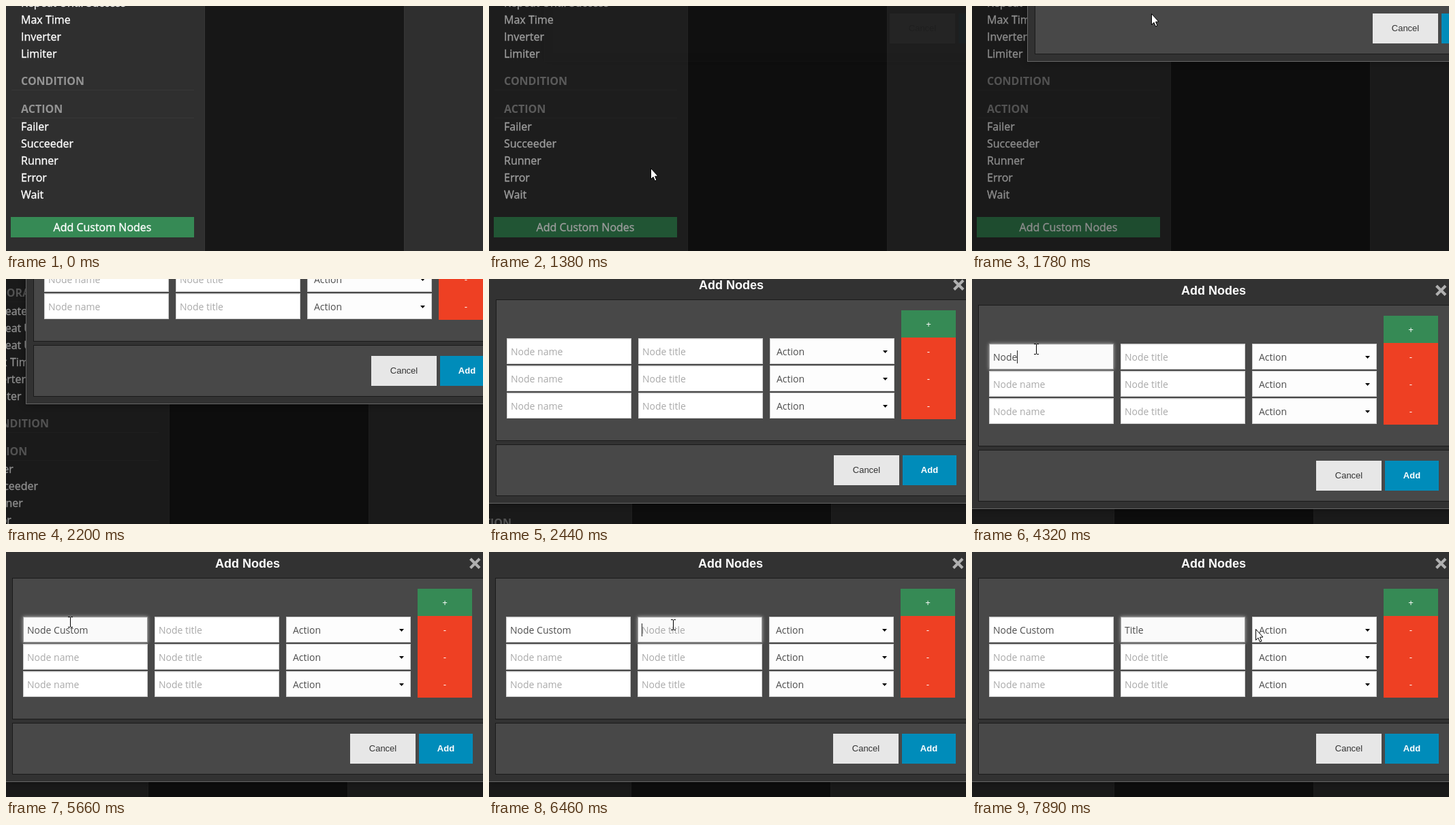
An HTML page with a canvas for the animation above (8 s loop, 700x360 px).

```html
<!DOCTYPE html>
<html lang="en">
<head>
<meta charset="utf-8">
<title>Add Nodes</title>
<style>
html, body { margin: 0; width: 100%; height: 100%; overflow: hidden; background: #171717; }
canvas { display: block; width: 700px; height: 360px; }
</style>
</head>
<body>
<canvas id="stage" width="700" height="360"></canvas>
<script>
const stage = document.getElementById('stage').getContext('2d');
const layer = new OffscreenCanvas(700, 360).getContext('2d');
let ctx = stage;

const LOOP = 8000;
const BLINK = 560;
const SANS = '"Open Sans", sans-serif';
const ARIAL = '"Liberation Sans", Arial, sans-serif';
const GREEN = '#368a55';

// Key points are [ms, values...] and are joined by straight moves.
const camera = [[1960, 0, 0], [2200, -52, 102], [2440, -82, 248], [2800, -83, 256]];
const fade = [[1240, 0, 0], [1360, 0.39, 0.035], [1480, 0.45, 1]];
const gestures = [
  { kind: 'arrow', until: 520, path: [[280, 537, 358], [400, 313, 329]] },
  { kind: 'hand', until: 1360, path: [[520, 222, 331], [760, 185, 327]] },
  { kind: 'arrow', until: 2080, path: [[1360, 237, 238], [1480, 267, 30], [1720, 263, 11]] },
  { kind: 'beam', until: 7840, path: [[3040, 103, 99], [3280, 94, 103], [5680, 94, 103],
    [6160, 273, 104], [6400, 270, 107], [7600, 270, 107], [7840, 416, 113]] },
  { kind: 'arrow', until: LOOP, path: [[7840, 416, 113]] }
];
const fields = [
  { hint: 'Node name', word: 'Node Custom', focus: 3280, start: 3930, gap: 116 },
  { hint: 'Node title', word: 'Title', focus: 6340, start: 6700, gap: 132 }
];

const clamp = (v, lo, hi) => Math.min(hi, Math.max(lo, v));

// The screen refreshes at a fixed beat.
const snap = t => 40 + Math.floor((t - 40) / 120) * 120;

function along(path, t) {
  const i = path.findIndex(key => key[0] > t);
  if (i === 0) return path[0].slice(1);
  if (i < 0) return path[path.length - 1].slice(1);
  const a = path[i - 1], b = path[i];
  const p = (t - a[0]) / (b[0] - a[0]);
  return a.slice(1).map((v, k) => v + (b[k + 1] - v) * p);
}

function rect(x, y, w, h, color) {
  ctx.fillStyle = color;
  ctx.fillRect(x, y, w, h);
}

function frame(x, y, w, h, fill, line) {
  rect(x, y, w, h, line);
  rect(x + 1, y + 1, w - 2, h - 2, fill);
}

function text(str, x, y, font, color, align = 'left', weight = 0) {
  ctx.font = font;
  ctx.fillStyle = ctx.strokeStyle = color;
  ctx.textAlign = align;
  ctx.fillText(str, x, y);
  if (weight) {
    ctx.lineWidth = weight;
    ctx.strokeText(str, x, y);
  }
}

function shape(points, fill, line) {
  ctx.beginPath();
  points.forEach(([x, y]) => ctx.lineTo(x, y));
  ctx.closePath();
  ctx.fillStyle = fill;
  ctx.fill();
  if (line) {
    ctx.strokeStyle = line;
    ctx.lineWidth = 1;
    ctx.stroke();
  }
}

function label(str, x, y, align) {
  text(str, x, y + 6, '16px ' + SANS, '#fff', align, 0.35);
}

function heading(str, y) {
  text(str, 22, y + 6, 'bold 16px ' + SANS, '#949494');
  rect(8, y + 13, 268, 1, '#373737');
}

function items(names, y) {
  names.forEach((name, i) => label(name, 22, y + i * 25));
}

function drawPage() {
  rect(-10, -300, 900, 800, '#2f2f2f');
  rect(292, -300, 292, 800, '#171717');
  rect(291, -300, 1, 800, '#363636');
  rect(584, -300, 1, 800, '#363636');
  heading('DECORATOR', -82);
  items(['Repeater', 'Repeat Until Failure', 'Repeat Until Success',
    'Max Time', 'Inverter', 'Limiter'], -55);
  heading('CONDITION', 110);
  heading('ACTION', 151);
  items(['Failer', 'Succeeder', 'Runner', 'Error', 'Wait'], 177);
  rect(7, 310, 269, 30, GREEN);
  label('Add Custom Nodes', 141.5, 325, 'center');
}

function drawField(x, y, value, hint, glow, caret) {
  if (glow) {
    ctx.save();
    ctx.shadowColor = `rgba(170,170,170,${glow})`;
    ctx.shadowBlur = 5;
    rect(x, y, 183, 38, '#999');
    ctx.restore();
  }
  frame(x, y, 183, 38, glow ? '#fafafa' : '#fff', glow ? '#999' : '#ccc');
  rect(x + 1, y + 1, 181, 1, 'rgba(0,0,0,.08)');
  const font = '14px ' + SANS;
  text(value || hint, x + 6, y + 25, font, value ? '#4d4d4d' : '#a9a9a9');
  if (caret) {
    rect(Math.round(x + 6 + ctx.measureText(value).width), y + 10, 1, 19, '#222');
  }
}

function drawLiveField(field, x, y, t, active) {
  const { word, focus, start, gap } = field;
  const count = clamp(Math.floor((t - start) / gap) + 1, 0, word.length);
  const lastKey = t < start ? focus : Math.min(t, start + gap * (word.length - 1));
  const caret = active && Math.floor((t - lastKey) / BLINK) % 2 === 0;
  const glow = active ? clamp((t - focus) / 120, 0, 1) : 0;
  drawField(x, y, word.slice(0, count), field.hint, glow, caret);
}

function drawSelect(y) {
  frame(411, y, 183, 38, '#fdfdfd', '#ccc');
  text('Action', 421, y + 25, '14px ' + SANS, '#4d4d4d');
  shape([[577, y + 18], [584, y + 18], [580.5, y + 22]], '#000');
}

function drawDialog(t) {
  ctx.save();
  ctx.shadowColor = 'rgba(0,0,0,.4)';
  ctx.shadowBlur = 10;
  rect(-2, -40, 760, 378, '#666');
  ctx.restore();
  rect(-1, -39, 758, 376, '#323232');
  text('Add Nodes', 307, 23, 'bold 18px ' + ARIAL, '#fff');

  ctx.strokeStyle = '#b0b0b0';
  ctx.lineWidth = 4;
  ctx.beginPath();
  ctx.moveTo(681.5, 10); ctx.lineTo(695, 23.5);
  ctx.moveTo(695, 10); ctx.lineTo(681.5, 23.5);
  ctx.stroke();

  frame(9, 38, 737, 208, '#484848', '#1b1b1b');
  frame(9, 251, 737, 76, '#484848', '#1b1b1b');

  const small = '13px ' + ARIAL;
  rect(604, 54, 80, 40, GREEN);
  text('+', 644, 79, small, '#fff', 'center');
  rect(604, 94, 80, 120, '#ee4023');

  const active = fields.filter(f => t >= f.focus).length - 1;
  for (let row = 0; row < 3; row++) {
    const y = 95 + row * 40;
    fields.forEach((field, col) => {
      const x = 25 + col * 193;
      if (row) drawField(x, y, '', field.hint);
      else drawLiveField(field, x, y, t, col === active);
    });
    drawSelect(y);
    text('-', 644, y + 24, small, '#fff', 'center');
  }

  rect(505, 267, 96, 44, '#e7e7e7');
  text('Cancel', 553, 293, small, '#333', 'center');
  rect(606, 267, 79, 44, '#008cba');
  text('Add', 645.5, 293, 'bold ' + small, '#fff', 'center');
}

const cursors = {
  arrow() {
    shape([[0.5, 0.5], [0.5, 16.5], [4, 13.2], [6.5, 19], [9, 18], [6.6, 12.3], [11, 12]], '#fff', '#000');
  },
  hand() {
    shape([[5.5, 1], [8.5, 1], [8.5, 7], [16, 9], [16.5, 15], [14.5, 21.5],
      [6.5, 21.5], [0.5, 12.5], [3, 10.5], [5.5, 13]], '#fff', '#000');
  },
  beam() {
    for (const y of [-8, 7]) {
      rect(-3, y, 3, 1, '#000');
      rect(1, y, 3, 1, '#000');
    }
    rect(0, -7, 1, 14, '#000');
  }
};

function drawPointer(t) {
  const gesture = gestures.find(g => t < g.until);
  if (!gesture || t < gesture.path[0][0]) return;
  const [x, y] = along(gesture.path, t).map(Math.round);
  ctx.save();
  ctx.translate(x, y);
  cursors[gesture.kind]();
  ctx.restore();
}

function draw(t) {
  const beat = snap(t);
  const [camX, camY] = along(camera, beat).map(Math.round);
  const [shade, opacity] = along(fade, beat);

  ctx = stage;
  ctx.save();
  ctx.translate(camX, camY);
  drawPage();
  rect(-10, -300, 900, 800, `rgba(0,0,0,${shade})`);
  ctx.restore();

  // The dialog fades as one piece, so it is drawn on its own layer.
  if (opacity > 0) {
    ctx = layer;
    ctx.clearRect(0, 0, 700, 360);
    ctx.save();
    ctx.translate(camX + 83, camY - 256);
    drawDialog(t);
    ctx.restore();
    ctx = stage;
    ctx.globalAlpha = opacity;
    ctx.drawImage(layer.canvas, 0, 0);
    ctx.globalAlpha = 1;
  }
  drawPointer(beat);
}

const start = performance.now();
function tick() {
  draw((performance.now() - start) % LOOP);
  requestAnimationFrame(tick);
}
tick();
</script>
</body>
</html>
```
